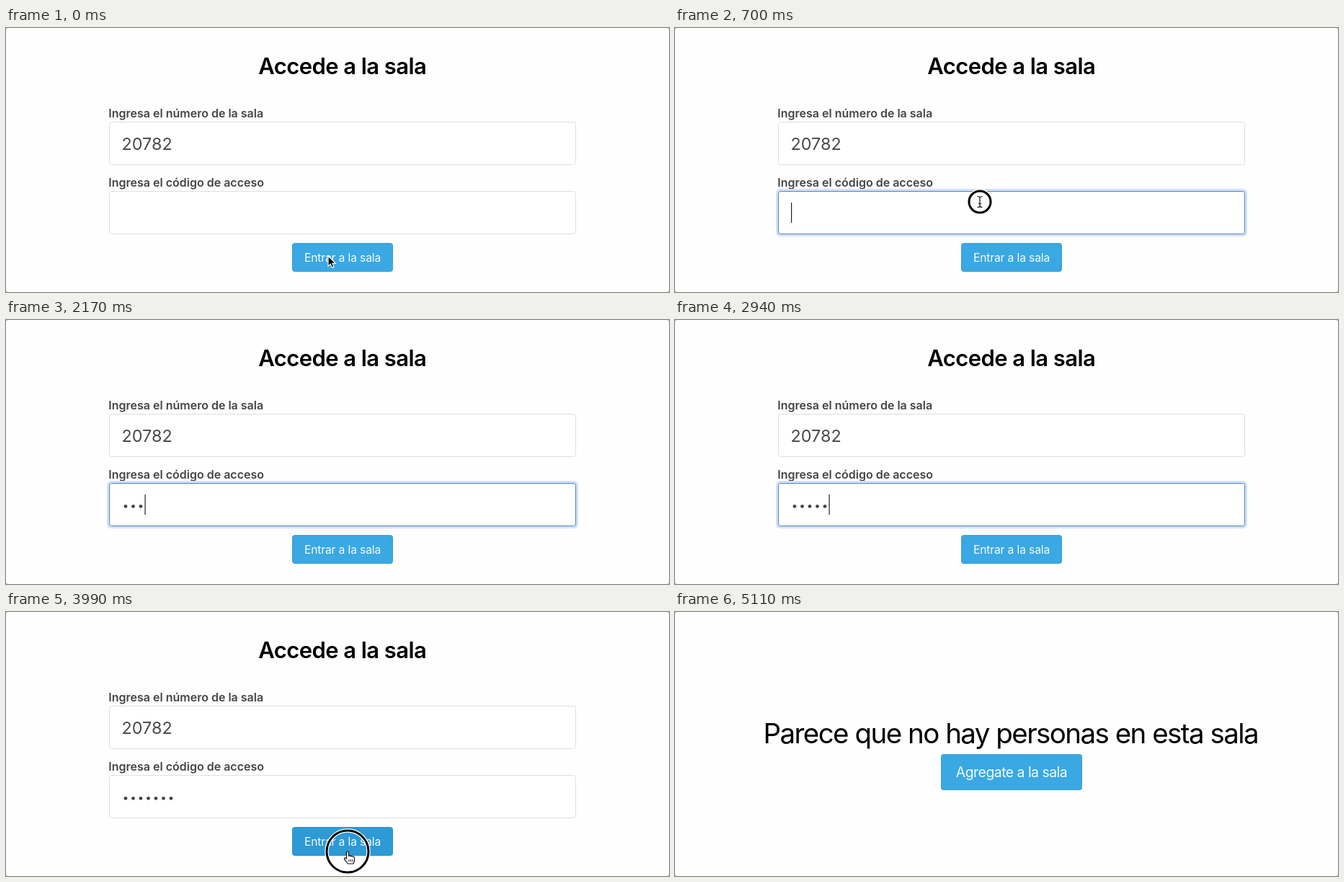
An HTML page for the animation above (5.32 s loop, 920 by 366 pixels).

```html
<!DOCTYPE html>
<html lang="es">
<head>
<meta charset="utf-8">
<title>Accede a la sala</title>
<style>
  html, body { margin: 0; width: 100%; height: 100%; overflow: hidden; background: #fff; }
  svg { display: block; width: 920px; height: 366px; }
  text { font-family: Inter, "Noto Sans", sans-serif; font-optical-sizing: none; }
  .mid { text-anchor: middle; }
  .title { font-size: 31px; font-weight: 560; letter-spacing: -.56px; }
  .label { font-size: 16px; font-weight: 600; fill: #444; }
  .value { font-size: 23.4px; fill: #4a4a4a; }
  .notice { font-size: 38.5px; letter-spacing: -1.6px; word-spacing: .3px; }
  .small { font-size: 15.7px; letter-spacing: -.16px; fill: #f4fbff; }
  .large { font-size: 19.4px; letter-spacing: -.5px; fill: #f4fbff; }
  .field { fill: #fff; stroke: #dfdfdf; }
  .field.focused { stroke: #4d82c4; }
  .halo { fill: #d3e1f6; }
  .button { fill: #3aa8e3; stroke: #3c9fd3; }
  .button.hover { fill: #2c9ad5; stroke: #2c94cb; }
  .glow { fill: #b9e0f5; }
  .ring { fill: none; }
  .outline { fill: none; stroke: #fff; stroke-linejoin: round; }
</style>
</head>
<body>
<svg viewBox="0 0 920 366">
  <rect width="920" height="366" fill="#a0a0a0"/>
  <rect width="920" height="366" rx="3" fill="#fefefe"/>

  <g id="form">
    <text class="title mid" x="466.7" y="64">Accede a la sala</text>
    <text class="label" x="142.3" y="124">Ingresa el número de la sala</text>
    <rect class="field" x="143.5" y="130.5" width="647" height="59" rx="3"/>
    <text class="value" x="160.5" y="169">20782</text>
    <text class="label" x="142.3" y="220">Ingresa el código de acceso</text>
    <rect id="halo" class="halo" x="140" y="223" width="654" height="66" rx="6"/>
    <rect id="code" class="field" x="143.5" y="226.5" width="647" height="59" rx="3"/>
    <g id="dots" fill="#444"></g>
    <rect id="caret" y="242" width="1.2" height="28" fill="#222"/>
    <rect id="glow" class="glow" x="395.5" y="296.5" width="143" height="43" rx="4.5"/>
    <rect id="enter" class="button" x="397.5" y="298.5" width="139" height="39" rx="3"/>
    <text class="small mid" x="467" y="324">Entrar a la sala</text>
  </g>

  <g id="empty">
    <text class="notice mid" x="465.8" y="182">Parece que no hay personas en esta sala</text>
    <rect class="button" x="369.5" y="197.5" width="195" height="49" rx="3"/>
    <text class="large mid" x="467" y="229">Agregate a la sala</text>
  </g>

  <g id="pointer">
    <g id="ring" class="ring">
      <circle stroke="#fff" stroke-width="5.5"/>
      <circle stroke="#000" stroke-width="3"/>
    </g>
    <path id="arrow" d="M0 0V14.2L3.3 11.2 5.5 16.2 8 15.1 5.8 10.3H10.2Z"
      fill="#000" stroke="#fff" stroke-width="1.2"/>
    <g id="beam">
      <path class="outline" stroke-width="3" d="M-3.5-7.5Q0-7.5 0-5.5 0-7.5 3.5-7.5M0-6V6M-3.5 7.5Q0 7.5 0 5.5 0 7.5 3.5 7.5M-2 2.5H2"/>
      <path fill="none" stroke="#111" stroke-width="1.2" d="M-3.5-7.5Q0-7.5 0-5.5 0-7.5 3.5-7.5M0-6V6M-3.5 7.5Q0 7.5 0 5.5 0 7.5 3.5 7.5M-2 2.5H2"/>
    </g>
    <g id="hand" stroke="#111" stroke-linejoin="round">
      <path fill="#fff" stroke-width="1.2" d="M-1.5 10V1.5a1.5 1.5 0 0 1 3 0V6.3q1.6-1.1 2.8.3 1.6-.9 2.7.6 2.5-.5 2.5 1.7V12.5L8 17H.4L-4.3 10.8q-.8-2.2 1.1-1.9Z"/>
      <path fill="none" stroke-width=".9" d="M2 11V14.2M4.3 11V14.2M6.6 11V14.2"/>
    </g>
  </g>
</svg>
<script>
const LOOP = 5320, FRAME = 70, PITCH = 10.5;
const $ = id => document.getElementById(id);
const show = (id, on) => { $(id).style.display = on ? "" : "none"; };

$("dots").innerHTML = Array.from({ length: 7 }, (_, i) =>
  `<circle cx="${166 + PITCH * i}" cy="258.3" r="2.4"/>`).join("");

const initial = {
  cursor: "arrow", x: 447, y: 316, ring: 0, typed: 0,
  focus: false, caret: false, hover: false, glow: false, entered: false
};

// Each step changes part of the state from its time (ms) onward.
const steps = [
  [560, { cursor: "hand", x: 441, y: 303, hover: true }],
  [630, { cursor: "beam", x: 423, y: 243, hover: false }],
  [700, { y: 241, ring: 15, focus: true, caret: true }],
  [840, { ring: 0 }],
  [1260, { caret: false }],
  [1610, { typed: 1, caret: true, cursor: "" }],
  [1960, { typed: 2 }],
  [2170, { typed: 3 }],
  [2520, { typed: 4 }],
  [2730, { typed: 5 }],
  [3010, { typed: 6 }],
  [3220, { typed: 7 }],
  [3360, { cursor: "beam", x: 430, y: 243 }],
  [3430, { x: 464, y: 265 }],
  [3570, { x: 486, y: 293 }],
  [3640, { cursor: "hand", x: 483, y: 312, hover: true }],
  [3710, { x: 479, y: 323 }],
  [3780, { x: 475, y: 330 }],
  [3850, { x: 474, y: 332 }],
  [3920, { ring: 15, focus: false, caret: false }],
  [3990, { ring: 29 }],
  [4060, { ring: 0, glow: true }],
  [4130, { y: 336 }],
  [4340, { cursor: "", hover: false }],
  [5040, { entered: true, glow: false }]
];

function stateAt(time) {
  return Object.assign({}, initial, ...steps.filter(([at]) => at <= time).map(([, change]) => change));
}

function draw(s) {
  show("form", !s.entered);
  show("empty", s.entered);
  show("halo", s.focus);
  show("caret", s.caret);
  show("glow", s.glow);
  show("ring", s.ring);
  for (const name of ["arrow", "beam", "hand"]) show(name, s.cursor === name);
  $("code").classList.toggle("focused", s.focus);
  $("enter").classList.toggle("hover", s.hover);
  $("caret").setAttribute("x", 161 + PITCH * s.typed);
  [...$("dots").children].forEach((dot, i) => { dot.style.display = i < s.typed ? "" : "none"; });
  for (const circle of $("ring").children) circle.setAttribute("r", s.ring);
  $("pointer").setAttribute("transform", `translate(${s.x} ${s.y})`);
}

function tick() {
  const time = performance.now() % LOOP;
  draw(stateAt(Math.floor(time / FRAME) * FRAME));
  requestAnimationFrame(tick);
}
tick();
</script>
</body>
</html>
```
